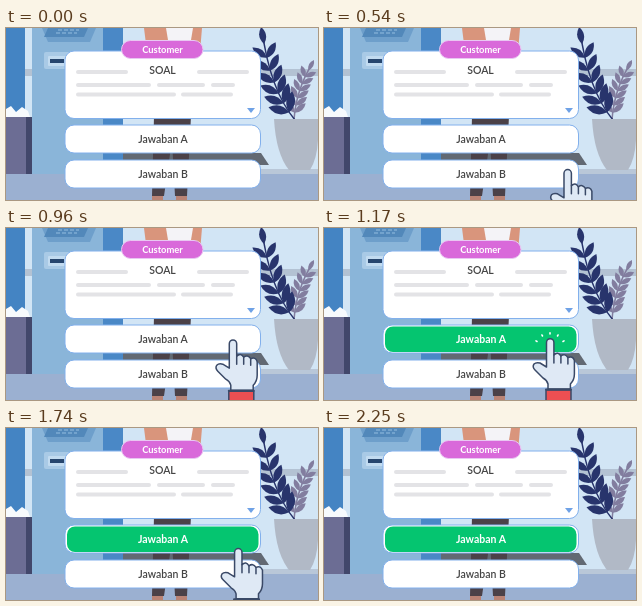
Recreate the animation shown at these times as an HTML page. Size 312x172 px, loop 3.6 s.

```html
<!DOCTYPE html>
<html lang="id">
<head>
<meta charset="utf-8">
<title>Quiz</title>
<style>
html, body { margin: 0; width: 100%; height: 100%; overflow: hidden; }
svg { display: block; width: 312px; height: 172px; }
text { font: 600 10.5px Lato, Carlito, sans-serif; text-anchor: middle; fill: #444; }
.card { fill: #fff; stroke: #82b0ec; }
.white { fill: #fff; font-weight: 700; }
</style>
</head>
<body>
<svg viewBox="0 0 312 172">
  <!-- room -->
  <rect width="312" height="172" fill="#d2e5f5"/>
  <path d="M0 41H312V48H0Z" fill="#b3c2d3"/>
  <path d="M0 141H312V146H0Z" fill="#b9c7d8"/>
  <path d="M0 146H312V172H0Z" fill="#9bb0d1"/>
  <path d="M117 125H255L263 137H117Z" fill="#626973"/>

  <!-- left machine and paper bin -->
  <path d="M0 0H19V90H0Z" fill="#4484c3"/>
  <path d="M0 92V81L5 78L10 84L16 79L22 83L25 92Z" fill="#f7fafd"/>
  <path d="M0 89H20V146H0Z" fill="#6c6d94"/>
  <path d="M20 89H26V146H20Z" fill="#42476b"/>

  <!-- machine -->
  <path d="M26 0H97V146H26Z" fill="#8ab5d9"/>
  <path d="M97 0H117V146H97Z" fill="#4a88c6"/>
  <path d="M36 0H90L84 14H42Z" fill="#6e9fcb"/>
  <path d="M42 0H82L78 9H38Z" fill="#5288ba"/>
  <path d="M52 2H73M50 5H71" stroke="#93bde0" stroke-dasharray="4 2"/>
  <rect x="38" y="24" width="50" height="17" rx="2" fill="#a9cae6"/>
  <rect x="42" y="28" width="20" height="10" rx="1" fill="#c2dbf0"/>
  <path d="M44 33H58" stroke="#27466e" stroke-width="4"/>

  <!-- person -->
  <path d="M138 0H196L194 24H141Z" fill="#d9957c"/>
  <path d="M160 0H187L183 24H164Z" fill="#f4f3f7"/>
  <path d="M148 88H185L181 168H169L166 112L158 168H146Z" fill="#4b4148"/>
  <path d="M146 168H157V172H146ZM170 168H181V172H170Z" fill="#b98375"/>

  <!-- plants -->
  <g id="plants" fill="none" stroke-width="1.5"></g>
  <path d="M268 91H312V112Q311 131 304 142H283Q270 126 268 91Z" fill="#b1b9c6"/>

  <!-- question -->
  <rect class="card" x="59" y="23" width="195.500" height="67.500" rx="9"/>
  <path d="M72 44H120M193 44H241M72 57H143M153 57H197M207 57H227M72 66.500H168M177 66.500H225"
    stroke="#e3e3e6" stroke-width="4" stroke-linecap="round"/>
  <path d="M241 80H249L245 85Z" fill="#6fa2e6"/>
  <rect x="115.500" y="12.500" width="81.500" height="18" rx="9" fill="#d969da" stroke="#e9c7f2"/>
  <text class="white" x="156.500" y="25" style="font-size:9.400px">Customer</text>
  <text x="156.500" y="46">SOAL</text>

  <!-- answers -->
  <rect class="card" x="59" y="97" width="195.500" height="28" rx="9"/>
  <rect id="green" x="61" y="98.500" width="191.500" height="25.500" rx="8" fill="#05c570"/>
  <text id="answer" x="157" y="115">Jawaban A</text>
  <rect class="card" x="59" y="132" width="195.500" height="28" rx="9"/>
  <text x="157" y="150">Jawaban B</text>

  <path id="spark" stroke="#fff" stroke-width="1.6" stroke-linecap="round"/>
  <g id="hand" stroke="#3a4967" stroke-width="1.5" stroke-linejoin="round" stroke-linecap="round">
    <path d="M-4 52H21V75H-4Z" fill="#ec4f52"/>
    <path d="M-3.500 4.500a3.700 3.700 0 0 1 7.400 0V17q4-4 7 1q4-3 7 1.500q5-2 6.500 3V36q0 6-4 10V51H-2V46q-1-4-5-6L-15 32q-3-3-1-6q2-2 6-1L-3.500 29Z" fill="#dfe9f5"/>
    <path d="M3.900 17V25M10.900 18V25M17.900 20V26" fill="none"/>
    <path d="M-4 51.500H21" stroke-width="2"/>
  </g>
</svg>
<script>
const el = id => document.getElementById(id);
const clamp = p => Math.max(0, Math.min(1, p));
const span = (t, a, b) => clamp((t - a) / (b - a));
const smooth = p => p * p * (3 - 2 * p);

// A curved stem from a through control b to tip c, with pairs of leaves.
function plant(a, b, c, pairs, size, color) {
  const leaf = (x, y, angle, s) =>
    `<path transform="translate(${x} ${y}) rotate(${angle})" d="M0 0Q${s * .5} ${-s * .4} ${s} 0Q${s * .5} ${s * .4} 0 0" fill="${color}"/>`;
  const point = (u, k) => (1 - u) ** 2 * a[k] + 2 * u * (1 - u) * b[k] + u * u * c[k];
  const slope = (u, k) => (1 - u) * (b[k] - a[k]) + u * (c[k] - b[k]);
  let out = `<path d="M${a}Q${b} ${c}" stroke="${color}"/>`;
  for (let i = 0; i <= pairs; i++) {
    const u = .12 + .76 * i / pairs;
    const angle = Math.atan2(slope(u, 1), slope(u, 0)) * 180 / Math.PI;
    const s = size * (1 - .25 * u);
    for (const turn of i < pairs ? [-42, 42] : [0])
      out += leaf(point(u, 0), point(u, 1), angle + turn, s);
  }
  return out;
}
el('plants').innerHTML =
  plant([288, 92], [290, 62], [306, 36], 6, 15, '#827d9f') +
  plant([289, 92], [264, 62], [256, 2], 6, 22, '#28346c');

function draw(now) {
  const t = Math.floor(now % 3600 / 30) * 30;
  const away = t < 1680
    ? (1 - span(t, 270, 810)) ** 1.2
    : span(t, 1680, 2250) ** 1.2;
  const press = smooth(span(t, 810, 1020)) - smooth(span(t, 1470, 1680));
  const x = 230 + 31 * away - 4 * press;
  const y = 116 + 57 * away - 6 * press;
  el('hand').setAttribute('transform', `translate(${x} ${y})`);

  const chosen = t >= 1170;
  el('green').style.display = chosen ? '' : 'none';
  el('answer').setAttribute('class', chosen ? 'white' : '');

  const p = span(t, 1170, 1380);
  let d = '';
  if (chosen && p < 1) for (let i = 0; i < 5; i++) {
    const a = (-150 + i * 30) * Math.PI / 180, r = 15 + 5 * p;
    const at = q => `${226 + q * Math.cos(a)} ${121 + q * Math.sin(a)}`;
    d += `M${at(r)}L${at(r + 1.2 * (1 - p))}`;
  }
  el('spark').setAttribute('d', d);
  el('spark').setAttribute('opacity', 1 - p);
}

const start = performance.now();
function tick() {
  draw(performance.now() - start);
  requestAnimationFrame(tick);
}
tick();
</script>
</body>
</html>
```
